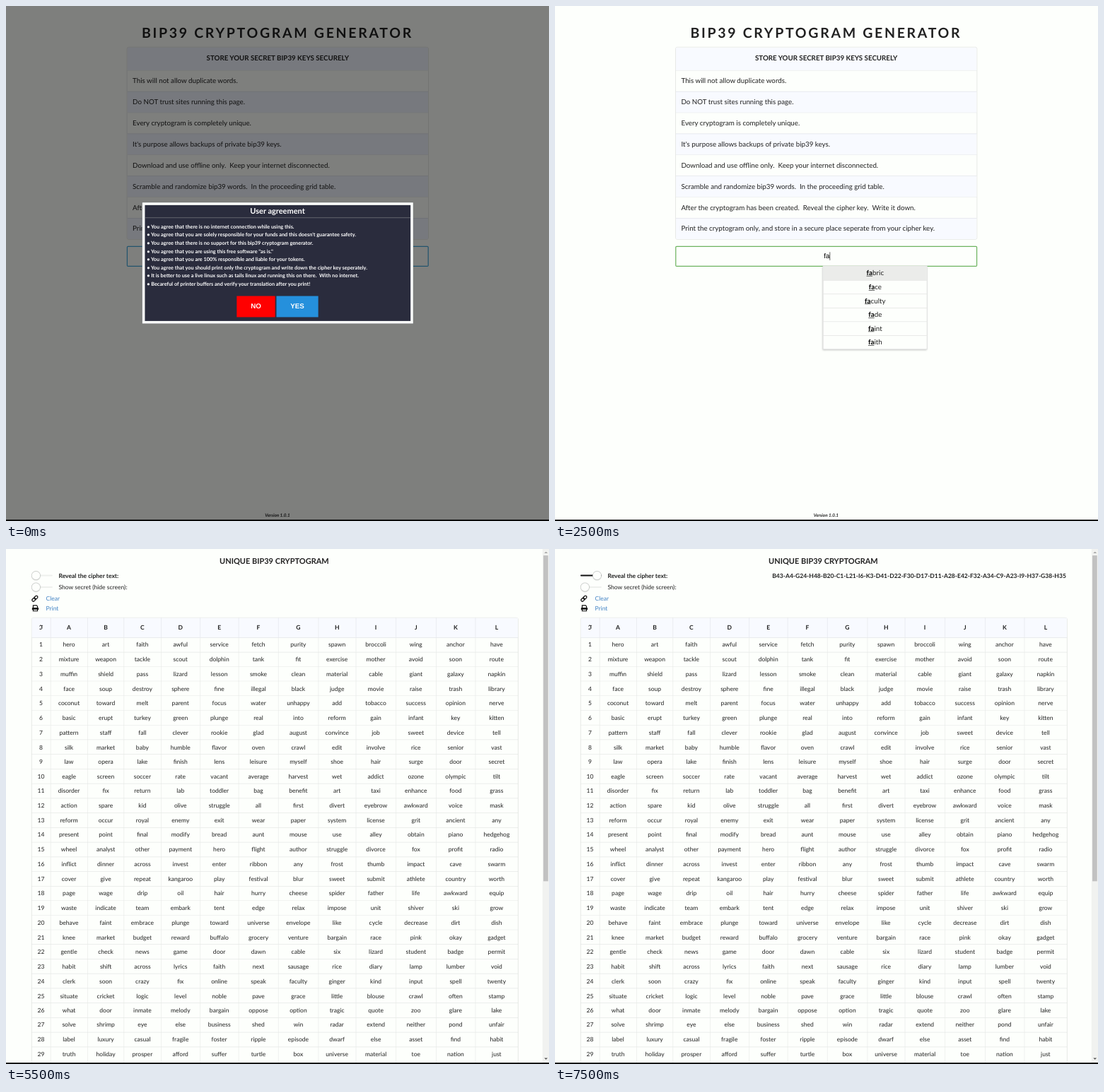
Write an HTML page that moves like this. It is 768 px wide and 729 px high and loops after 8 s.

```html
<!DOCTYPE html>
<html lang="en">
<head>
<meta charset="utf-8">
<title>BIP39 Cryptogram Generator</title>
<style>
html, body { margin: 0; width: 100%; height: 100%; overflow: hidden; background: #fdfffc; }
#stage { position: absolute; left: 0; top: 0; width: 1260px; height: 1196px; overflow: hidden;
  transform: scale(.61); transform-origin: 0 0; background: #fdfffc; color: #212121;
  font: 16px/1.2 Lato, sans-serif; white-space: pre; text-rendering: geometricPrecision; }
#stage * { box-sizing: border-box; }
#stage [hidden] { display: none; }
.abs, .tags, .drop { position: absolute; }
.full { left: 0; top: 0; width: 1259px; height: 1196px; }
.mid { text-align: center; }
.alt { background: #f8faff; }
.dim .alt { background: #f0f4fd; }

h1 { left: 0; top: 41.5px; width: 1259px; margin: 0; font-size: 32px; line-height: 40px; letter-spacing: 4.4px; }
.intro { left: 280px; top: 95px; width: 700px; border: 1px solid #2224262a; border-radius: 4.5px; overflow: hidden; }
.intro div { height: 49px; line-height: 48px; padding-left: 12.6px; border-top: 1px solid #2224261a; }
.intro .head { height: 52.6px; line-height: 52.6px; padding: 0; border: 0; font-weight: bold; }
.version { left: 0; top: 1173px; width: 1259px; font: italic bold 10.4px/20px Lato, sans-serif; }

.field { left: 280px; top: 557px; width: 700px; border: 2px solid #6cb35f; border-radius: 3px;
  font: 16px/31px "Liberation Sans", Arial, sans-serif; color: #000; }
.field.empty { border-color: #45a9dc; }
.hint { left: 2px; top: 6.5px; width: 100%; color: #757575; }
.tags { left: -2px; width: 700px; height: 31px; display: flex; justify-content: center; gap: 5.5px; }
.tag { position: relative; height: 31px; line-height: 29px; padding: 0 29.7px 0 8px;
  border: 1px solid #cfcfcf; border-radius: 2px; background: #f0f1ef; }
.tag.new { border-color: #aaa; background: #e7e8e6; }
.tag::after { content: "×"; position: absolute; right: 5.4px; top: 0; width: 20px;
  text-align: center; font-size: 22px; color: #999; }
.typed { position: relative; padding-left: 2px; }
.caret { display: inline-block; width: 1.5px; height: 19px; margin-right: -1.5px; vertical-align: -4px; background: #000; }
.drop { left: 0; top: 37.5px; width: 242px; border: 1px solid #d0d0d0; background: #fdfffc;
  box-shadow: 0 2px 4px #0004; font: 16px/31px Lato, sans-serif; color: #212121; text-align: center; }
.drop div { height: 32px; border-top: 1px solid #ddd; }
.drop div:first-child { border: 0; }
.drop .on { background: #ebecea; }
.drop u { font-weight: bold; color: #000; }

.shade { background: #00000080; }
.modal { left: 315.5px; top: 455.5px; width: 628px; height: 281px; border: 6px solid #fdfffc;
  background: #2a2c3d; color: #fff; font-weight: bold; }
.modal .name { top: 0; left: 0; width: 100%; height: 30px; line-height: 27px; font-size: 18px; border-bottom: 1px solid #85868c; }
.modal .terms { left: 5px; top: 40px; font-size: 12px; line-height: 19px; }
.modal b { position: absolute; top: 211px; height: 49px; font: bold 16px/48px "Liberation Sans", Arial, sans-serif; text-align: center; }

.sheet { font-size: 14px; }
.sheet .abs { line-height: 20px; }
.sheet h3 { left: 0; top: 17px; width: 1244px; margin: 0; font-size: 18px; }
.link { left: 92.5px; color: #4183c4; }
.track { left: 58.5px; width: 49px; height: 3.5px; border-radius: 9px; background: #0000000f; }
.track i { position: absolute; left: 0; top: -8.7px; width: 21px; height: 21px; border-radius: 50%;
  background: #fdfffc; border: 1px solid #22242640; box-shadow: 0 1px 2px #0002; }
.track.on { background: #111; }
.track.on i { left: 28px; }
table { position: absolute; left: 58.5px; top: 159px; width: 1127px; table-layout: fixed;
  border-collapse: separate; border-spacing: 0; border: 1px solid #2224262a; border-radius: 4.5px; }
td, th { padding: 0; height: 33.95px; line-height: 20px; text-align: center; border: 0 solid #2224261a; border-width: 0 0 1px 1px; }
th { height: 45.6px; background: #f8faff; }
td:first-child, th:first-child { border-left: 0; }
.bar { left: 1244px; top: 0; width: 15px; height: 1192px; background: #f1f2f0; }
.thumb { left: 2px; width: 11px; height: 756px; background: #c1c1c1; }
.arrow { left: 3.5px; border: 4px solid transparent; }
.line { left: 0; top: 1191.8px; width: 1260px; height: 6px; background: #000; }
</style>
</head>
<body>
<div id="stage">
  <div id="entry" class="abs full">
    <h1 class="abs mid">BIP39 CRYPTOGRAM GENERATOR</h1>
    <div class="abs intro" id="intro"></div>
    <div class="abs field" id="field"></div>
    <div class="abs mid version">Version 1.0.1</div>
  </div>
  <div id="agree" class="abs full shade">
    <div class="abs modal">
      <div class="abs mid name">User agreement</div>
      <div class="abs terms" id="terms"></div>
      <b style="left:213.5px;width:89px;background:#f00">NO</b>
      <b style="left:305.5px;width:97px;background:#2590dc">YES</b>
    </div>
  </div>
  <div id="result" class="abs full sheet">
    <div id="page" class="abs full">
      <h3 class="abs mid">UNIQUE BIP39 CRYPTOGRAM</h3>
      <div class="abs track" id="reveal" style="top:59.7px"><i></i></div>
      <b class="abs" style="left:122px;top:51.5px">Reveal the cipher text:</b>
      <b class="abs" id="cipher" style="right:74px;top:51.5px">B43-A4-G24-H48-B20-C1-L21-I6-K3-D41-D22-F30-D17-D11-A28-E42-F32-A34-C9-A23-I9-H37-G38-H35</b>
      <div class="abs track" style="top:86.5px"><i></i></div>
      <span class="abs" style="left:122px;top:78.5px">Show secret (hide screen):</span>
      <svg class="abs" style="left:59px;top:107px" width="16" height="16" fill="none" stroke="#111" stroke-width="2">
        <g transform="rotate(-45 8 8)"><rect x="0" y="5" width="9" height="6" rx="3"/><rect x="7" y="5" width="9" height="6" rx="3"/></g>
      </svg>
      <span class="abs link" style="top:105px">Clear</span>
      <svg class="abs" style="left:59.5px;top:129px" width="16" height="16" fill="none" stroke="#111" stroke-width="2">
        <path d="M3 7V2h8l2 2v3"/><path d="M0 12V9q0-2 2-2h12q2 0 2 2v3z" fill="#111" stroke="none"/><path d="M3 10.500h10V15H3z" fill="#fdfffc"/>
      </svg>
      <span class="abs link" style="top:127px">Print</span>
      <table id="grid"></table>
    </div>
    <div class="abs bar">
      <div class="abs thumb" id="thumb"></div>
      <div class="abs arrow" id="up" style="top:2px"></div>
      <div class="abs arrow" id="down" style="top:1181px"></div>
    </div>
  </div>
  <div class="abs line"></div>
</div>
<script>
const $ = id => document.getElementById(id);

const intro = `This will not allow duplicate words.
Do NOT trust sites running this page.
Every cryptogram is completely unique.
It's purpose allows backups of private bip39 keys.
Download and use offline only.  Keep your internet disconnected.
Scramble and randomize bip39 words.  In the proceeding grid table.
After the cryptogram has been created.  Reveal the cipher key.  Write it down.
Print the cryptogram only, and store in a secure place seperate from your cipher key.`.split("\n");

const terms = `You agree that there is no internet connection while using this.
You agree that you are solely responsible for your funds and this doesn't guarantee safety.
You agree that there is no support for this bip39 cryptogram generator.
You agree that you are using this free software "as is."
You agree that you are 100% responsible and liable for your tokens.
You agree that you should print only the cryptogram and write down the cipher key seperately.
It is better to use a live linux such as tails linux and running this on there.  With no internet.
Becareful of printer buffers and verify your translation after you print!`;

const rows = `hero art faith awful service fetch purity spawn broccoli wing anchor have
mixture weapon tackle scout dolphin tank fit exercise mother avoid soon route
muffin shield pass lizard lesson smoke clean material cable giant galaxy napkin
face soup destroy sphere fine illegal black judge movie raise trash library
coconut toward melt parent focus water unhappy add tobacco success opinion nerve
basic erupt turkey green plunge real into reform gain infant key kitten
pattern staff fall clever rookie glad august convince job sweet device tell
silk market baby humble flavor oven crawl edit involve rice senior vast
law opera lake finish lens leisure myself shoe hair surge door secret
eagle screen soccer rate vacant average harvest wet addict ozone olympic tilt
disorder fix return lab toddler bag benefit art taxi enhance food grass
action spare kid olive struggle all first divert eyebrow awkward voice mask
reform occur royal enemy exit wear paper system license grit ancient any
present point final modify bread aunt mouse use alley obtain piano hedgehog
wheel analyst other payment hero flight author struggle divorce fox profit radio
inflict dinner across invest enter ribbon any frost thumb impact cave swarm
cover give repeat kangaroo play festival blur sweet submit athlete country worth
page wage drip oil hair hurry cheese spider father life awkward equip
waste indicate team embark tent edge relax impose unit shiver ski grow
behave faint embrace plunge toward universe envelope like cycle decrease dirt dish
knee market budget reward buffalo grocery venture bargain race pink okay gadget
gentle check news game door dawn cable six lizard student badge permit
habit shift across lyrics faith next sausage rice diary lamp lumber void
clerk soon crazy fix online speak faculty ginger kind input spell twenty
situate cricket logic level noble pave grace little blouse crawl often stamp
what door inmate melody bargain oppose option tragic quote zoo glare lake
solve shrimp eye else business shed win radar extend neither pond unfair
label luxury casual fragile foster ripple episode dwarf else asset find habit
truth holiday prosper afford suffer turtle box universe material toe nation just
siege struggle small beyond account gap matrix obtain trigger cupboard length small
write physical scout soup boss hand town walk burden clean essay upgrade
live cigar drop island cram ladder portion father gauge penalty best chapter
denial elite sea forest unique pear nut ankle inherit pledge glare banana
lady wrong hint near lobster wear borrow fly drip stadium gather pole
jazz volume saddle furnace inform piano possible hamster wealth next climb say
cushion govern fuel essay camera tomato dolphin dress receive age inhale vacuum
pulse time false biology breeze squeeze obvious half farm celery live village
hollow entry error lucky unable seminar hammer vivid stuff move barely now
trim task credit hawk attitude panic mass sponsor light language illness miss
soldier disease hair decrease bench angry candy salad silent vote jazz earn
faint guitar thing gallery client person mesh island manage mercy say visit
cake plunge neglect fence labor van mango broccoli wage raise major afford
elbow fabric sign spend manual empower vanish evolve case token text skill
craft alarm faint master grant total what only essay surge father cushion
jar cheese brass floor pretty share swift core habit camp disagree family
chaos cave vehicle grace assume sort second jeans drum stable devote exclude
obvious love antenna movie gun history outdoor visit drill supply snap goddess
amateur solid foil book gate live carbon fade exchange video wine glimpse`.split("\n");

const picked = `fabric face faculty fade faint faith gadget gain galaxy gallery game gap
 kangaroo lab label labor ladder lady lake`.split(/\s+/);

const colWidths = [43, 86, 84.5, 85.5, 91, 89, 92.5, 92.5, 87, 93, 93, 91, 99];

$("intro").innerHTML = '<div class="head alt mid">STORE YOUR SECRET BIP39 KEYS SECURELY</div>' +
  intro.map((s, i) => `<div class="${i % 2 ? "alt" : ""}">${s}</div>`).join("");
$("terms").textContent = terms.replace(/^/gm, "• ");

const cells = (tag, list) => `<tr>${list.map(s => `<${tag}>${s}</${tag}>`).join("")}</tr>`;
$("grid").innerHTML = `<colgroup>${colWidths.map(w => `<col style="width:${w}px">`).join("")}</colgroup>` +
  cells("th", ["ℑ", ..."ABCDEFGHIJKL"]) +
  rows.map((r, i) => cells("td", [i + 1, ...r.split(" ")])).join("");

function drawField(count, typed, options, selected) {
  const box = $("field"), perRow = 8;
  const lines = Math.floor(count / perRow) + 1;
  box.classList.toggle("empty", !typed);
  box.style.height = 48 + 39.3 * (lines - 1) + "px";
  if (!typed) {
    box.innerHTML = '<div class="abs hint mid">ENTER BIP39 WORDS</div>';
    return;
  }
  const items = options.split(" ").map((w, i) =>
    `<div class="${selected && !i ? "on" : ""}"><u>${typed}</u>${w.slice(typed.length)}</div>`).join("");
  const caret = selected ? '<i class="caret"></i>' : "";
  const input = `<span class="typed">${typed}${caret}<span class="drop">${items}</span></span>`;
  const tags = picked.slice(0, count).map((w, i) =>
    `<div class="tag ${i === count - 1 ? "new" : ""}">${w}</div>`);
  const parts = [...tags, input];
  box.innerHTML = Array.from({ length: lines }, (_, n) =>
    `<div class="tags" style="top:${6.5 + 39.3 * n}px">${parts.slice(n * perRow, (n + 1) * perRow).join("")}</div>`).join("");
}

function showEntry(count, typed, options, selected) {
  $("entry").hidden = false;
  $("result").hidden = $("agree").hidden = true;
  $("entry").className = "abs full";
  $("entry").style.left = selected ? "-1px" : 0;
  drawField(count, typed, options, selected);
}

function showAgreement() {
  showEntry(0);
  $("agree").hidden = false;
  $("entry").classList.add("dim");
}

function showResult(scroll, revealed) {
  $("entry").hidden = $("agree").hidden = true;
  $("result").hidden = false;
  $("page").style.top = -scroll + "px";
  $("thumb").style.top = (scroll ? 421 : 15) + "px";
  $("up").style.borderBottomColor = scroll ? "#505050" : "#a3a3a3";
  $("down").style.borderTopColor = scroll ? "#a3a3a3" : "#505050";
  $("reveal").classList.toggle("on", revealed);
  $("cipher").hidden = !revealed;
}

const scenes = [
  [0, showAgreement],
  [500, () => showEntry(0)],
  [2500, () => showEntry(0, "fa", "fabric face faculty fade faint faith", true)],
  [3500, () => showEntry(7, "ga", "gain galaxy gallery game gap garage")],
  [4500, () => showEntry(19, "ha", "habit hair half hammer hamster hand")],
  [5500, () => showResult(0, false)],
  [6500, () => showResult(643, false)],
  [7500, () => showResult(0, true)],
];

let current;
function tick() {
  const t = performance.now() % 8000;
  const scene = scenes.findLast(([start]) => t >= start);
  if (scene !== current) (current = scene)[1]();
  requestAnimationFrame(tick);
}
tick();
</script>
</body>
</html>
```
